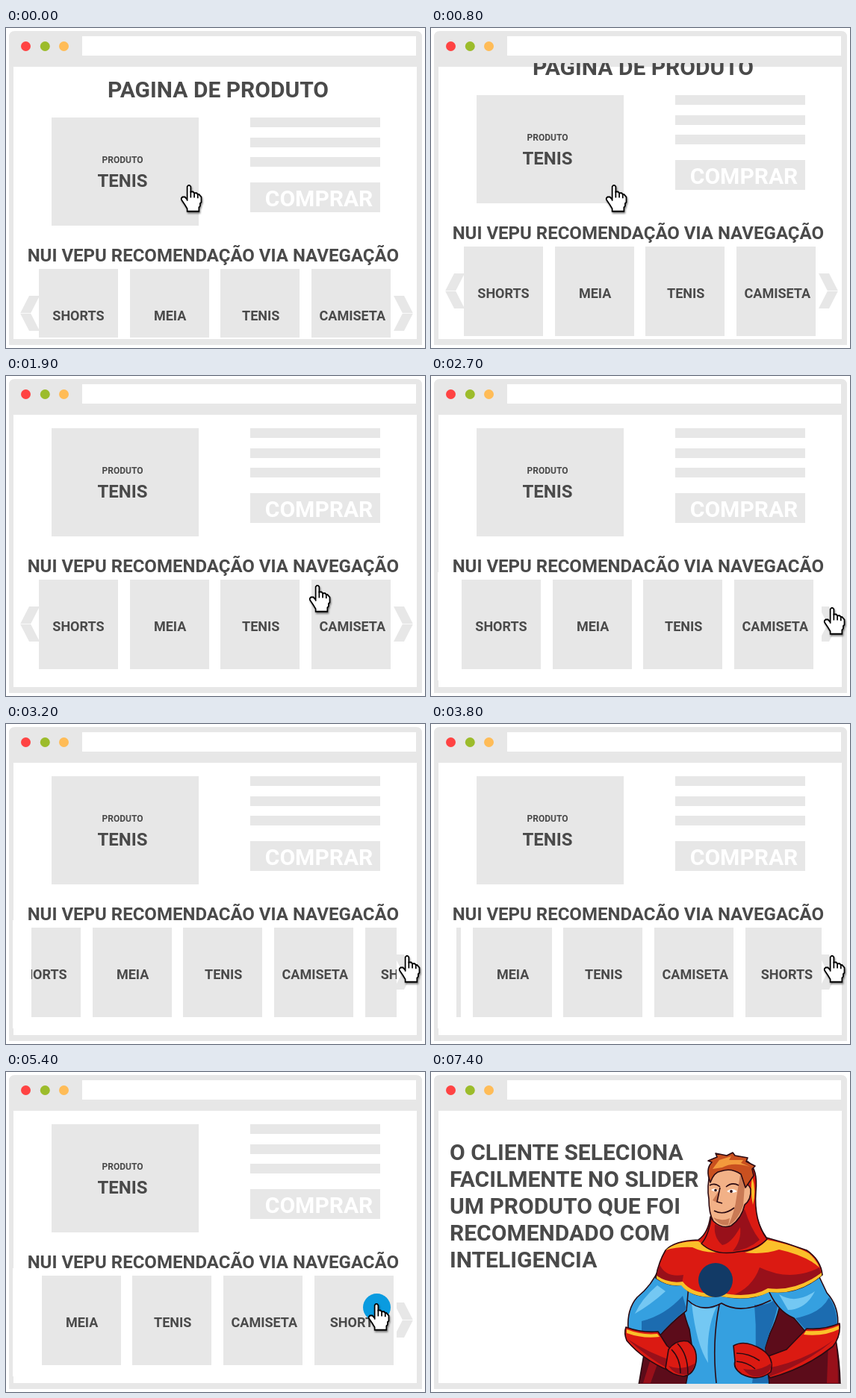
Write an HTML page that moves like this. It is 561 by 429 pixels and loops after 8 s.

```html
<!DOCTYPE html>
<html lang="pt">
<head>
<meta charset="utf-8">
<title>Slider de produtos</title>
<style>
  html, body { margin: 0; width: 100%; height: 100%; overflow: hidden; background: #fff; }
  svg { display: block; }
  text { font-family: Roboto, "Liberation Sans", sans-serif; font-weight: 700; fill: #4a4a4a; text-anchor: middle; }
  .grey { fill: #e7e7e7; }
  .white { fill: #fff; }
  #hand { filter: drop-shadow(1.5px 2px 1.2px rgba(0, 0, 0, .5)); }
  #hero path { stroke: #2b0a12; stroke-width: 1.6; stroke-linejoin: round; }
  #hero .flat { stroke: none; }
  #hero .line { fill: none; }
  .red { fill: #db1a12; } .deep { fill: #98101a; } .cape { fill: #5c0c1a; }
  .blue { fill: #35a0e0; } .shade { fill: #1c6cb0; } .sky { fill: #74c8f3; }
  .gold { fill: #fbc02a; } .skin { fill: #f2b187; } .tan { fill: #c97a55; } .hair { fill: #c9501f; } .glow { fill: #f39a3c; }
</style>
</head>
<body>
<svg width="561" height="429" viewBox="0 0 561 429">
  <defs>
    <clipPath id="page"><rect x="0" y="47" width="561" height="368"/></clipPath>
    <clipPath id="strip"><rect x="34" y="263" width="489" height="140"/></clipPath>
    <clipPath id="floor"><rect x="0" y="52" width="561" height="366"/></clipPath>
  </defs>

  <path class="grey" d="M4 425V12Q4 4 12 4H549Q557 4 557 12V425Z"/>
  <rect class="white" x="10" y="52" width="540" height="365"/>
  <rect class="white" x="102" y="11" width="447" height="26"/>
  <circle cx="26.5" cy="24.5" r="6.5" fill="#ff4343"/>
  <circle cx="52.3" cy="24.5" r="6.5" fill="#9cbc2b"/>
  <circle cx="77.5" cy="24.5" r="6.5" fill="#ffbc57"/>

  <g id="shop">
    <g clip-path="url(#page)">
      <g id="content"></g>
      <g id="slider">
        <rect class="white" x="9" y="263" width="514" height="145"/>
        <g clip-path="url(#strip)"><g id="track"></g></g>
      </g>
    </g>
    <circle id="tap" cx="496.5" cy="315.5" r="18.5" fill="#0a9be0"/>
    <g id="hand">
      <g transform="scale(1.57 1.74)" fill="#fff" stroke="#000" stroke-width="1.1">
        <path d="M5.5 12.5V1.5L6.5 .5H7.5L8.5 1.5V5.5H10.5L11.5 6.5H13.5L14.5 7.5H15.5L17.5 9.5V13.5L16.5 14.5V16.5L15.5 17.5V20.5H5.5V18.5L3.5 15.5L.5 11.5V10.5L1.5 9.5H3.5L5.5 11.5"/>
        <path fill="none" d="M8.5 5V10M11.5 6.5V10M14.5 7.5V10.5"/>
      </g>
    </g>
  </g>

  <g id="ending">
    <g id="message"></g>
    <g id="hero" clip-path="url(#floor)">
      <!-- cape -->
      <path class="cape" d="M318 250Q300 300 290 350L278 420H548Q547 360 526 295L500 250Z"/>
      <path class="deep flat" d="M298 372L284 417H294L308 378ZM532 364L530 417H545Q545 385 541 356Z"/>
      <!-- torso -->
      <path class="blue" d="M330 275Q336 320 346 345L350 372L341 420H453L447 370L454 350Q470 318 474 270Z"/>
      <path class="shade flat" d="M433 312Q458 314 468 296Q460 335 453 350L447 370L452 417H430Q438 366 433 312Z"/>
      <path class="sky flat" d="M349 310Q366 322 382 315Q368 345 371 390Q355 365 349 310Z"/>
      <path class="line" d="M344 306Q362 324 389 310Q415 326 455 306M386 312Q376 362 382 417"/>
      <!-- arms -->
      <path class="blue" d="M306 262Q296 286 276 302Q262 318 264 345L302 358Q322 335 342 320L346 275Z"/>
      <path class="shade flat" d="M282 334Q314 326 337 300L342 318Q320 336 303 356L282 350Z"/>
      <path class="sky flat" d="M303 286Q282 304 273 324Q294 312 314 294Z"/>
      <path class="blue" d="M450 288Q462 320 486 330L508 356L544 344Q548 316 530 296L512 258Z"/>
      <path class="shade flat" d="M488 330L509 354L543 341Q545 320 533 302Q522 324 488 330Z"/>
      <path class="sky flat" d="M466 298Q488 312 514 294Q502 318 478 319Z"/>
      <!-- gloves -->
      <path class="red" d="M261 342Q258 350 262 360Q284 386 318 400L336 384L316 367L304 348Q282 350 261 342Z"/>
      <path class="deep flat" d="M263 358Q290 383 318 398L328 389Q290 376 263 358Z"/>
      <path class="gold flat" d="M262 345Q282 353 303 351L306 355Q284 358 262 350Z"/>
      <path class="red" d="M318 372Q328 358 344 361Q357 370 355 388Q352 406 338 408Q322 406 314 397Z"/>
      <path class="deep flat" d="M318 394Q334 401 353 391Q350 405 338 406Q325 405 318 394Z"/>
      <path class="line" d="M330 364Q344 378 344 405M322 372Q334 384 334 404"/>
      <path class="red" d="M503 344Q526 346 547 337Q549 354 538 368Q500 398 454 410L438 386L476 372Z"/>
      <path class="deep flat" d="M541 358Q504 390 454 408L446 398Q500 388 541 358Z"/>
      <path class="gold flat" d="M502 347Q526 349 546 340V345Q526 355 499 352Z"/>
      <path class="red" d="M405 367Q420 358 443 372Q460 383 455 402Q438 416 416 405Q404 397 407 388Z"/>
      <path class="deep flat" d="M418 398Q440 402 456 390Q456 404 440 408Q426 410 418 398Z"/>
      <path class="line" d="M409 377Q426 377 440 387M409 388Q424 389 434 398"/>
      <!-- shoulders -->
      <path class="red" d="M374 194Q371 216 358 225Q326 226 314 239Q304 256 301 276Q318 288 336 285Q350 305 388 300Q428 308 452 294Q490 300 524 272Q522 252 503 239Q476 229 449 222Q438 207 434 186Z"/>
      <path class="deep flat" d="M418 208Q428 226 450 237Q424 246 398 237ZM440 262Q482 282 520 262L523 272Q488 298 452 293Q428 306 402 300Q430 290 440 262ZM306 258Q314 276 338 272L336 284Q318 287 302 275Z"/>
      <path class="gold flat" d="M314 239Q330 226 358 227Q372 238 394 240Q370 245 350 235Q330 234 314 239ZM420 242Q440 237 450 225Q486 232 506 243Q516 252 520 262Q502 246 466 238Q446 245 420 242Z"/>
      <path class="gold flat" d="M302 273Q318 284 337 281Q351 300 388 296Q428 304 451 290Q488 295 523 269V273Q490 300 453 295Q428 308 388 301Q350 305 335 286Q317 288 302 277Z"/>
      <circle cx="381" cy="279" r="23" fill="#123a66"/>
      <!-- head -->
      <path class="red" d="M376 190Q372 220 362 230Q380 247 411 241Q436 239 450 224Q432 200 435 160Q438 130 424 120L390 118Z"/>
      <path class="deep flat" d="M380 204Q398 216 420 184Q428 210 440 225Q424 239 404 240Q416 226 414 208Q402 230 390 232Q378 222 380 204Z"/>
      <path class="gold flat" d="M430 140Q436 160 431 178Q427 160 430 140Z"/>
      <path class="skin" d="M374 134Q369 154 372 170Q372 190 378 200Q390 211 402 206Q416 196 420 178Q429 171 428 157Q424 148 420 150L416 126L382 124Z"/>
      <path class="tan flat" d="M414 138L420 152L418 179Q411 199 398 206Q407 186 409 168ZM378 195Q389 201 400 196L398 205Q386 207 378 195ZM387 157L383 175L377 172Z"/>
      <path class="hair" d="M374 148Q367 130 376 121L371 119L383 114L381 109L396 112L404 108L407 112L424 115L422 120L434 126L430 130L432 139L421 155L415 137Q402 128 388 133Q379 134 374 148Z"/>
      <path class="glow flat" d="M377 130L386 118L402 113L399 118L418 118L415 122L427 127Q404 120 390 128Z"/>
      <path class="line" d="M373 152Q380 148 387 154M395 154Q403 147 412 152M387 155L383 174L390 176M379 186Q392 193 406 182"/>
      <path class="white flat" d="M375 158Q380 154 385 159Q380 162 375 158ZM396 160Q403 154 410 160Q403 164 396 160Z"/>
      <circle cx="381" cy="158.500" r="1.800" fill="#2b0a12"/>
      <circle cx="402" cy="160" r="1.900" fill="#2b0a12"/>
    </g>
  </g>
</svg>
<script>
const LOOP = 8000, STEP = 100;
const $ = id => document.getElementById(id);
const rect = (x, y, w, h) => `<rect class="grey" x="${x}" y="${y}" width="${w}" height="${h}"/>`;
const label = (str, x, y, size, style = '') =>
  `<text x="${x}" y="${y}" font-size="${size}" style="${style}">${str}</text>`;

const products = ['SHORTS', 'MEIA', 'TENIS', 'CAMISETA', 'SHORTS'];
const cards = (count, top) => products.slice(0, count).map((name, i) => {
  const x = Math.round(44 + i * 121.7);
  return rect(x, top, 106, 120) + label(name, x + 53 + i * 0.6, top + 69, 18);
}).join('');

const arrow = (x, dir) =>
  `<g transform="translate(${x} 359) scale(${dir} 1)">
    <path class="grey" d="M0 0H14L26 23.500L14 47H0L12 23.500Z"/>
    <path d="M11 23.500H26" stroke="#fff" stroke-width=".8"/>
  </g>`;

$('content').innerHTML =
  label('PAGINA DE PRODUTO', 284, 92.5, 30) +
  rect(61, 120, 197, 145) + label('PRODUTO', 156, 181, 12) + label('TENIS', 156, 213, 24) +
  [120, 147, 173].map(y => rect(327, y, 174, 13)).join('') +
  rect(327, 207, 174, 40) + label('COMPRAR', 419, 238.5, 30, 'fill:#fff') +
  label('NUI VEPU RECOMENDAÇÃO VIA NAVEGAÇÃO', 526, 313, 24, 'text-anchor:end') +
  arrow(45, -1) + arrow(519, 1) + cards(4, 323);

$('track').innerHTML = cards(5, 273);

$('message').innerHTML =
  ['O CLIENTE SELECIONA', 'FACILMENTE NO SLIDER', 'UM PRODUTO QUE FOI', 'RECOMENDADO COM', 'INTELIGENCIA']
    .map((line, i) => label(line, 25, 118 + 36 * i, 30, 'text-anchor:start')).join('');

// Keys are [time, value...]; values between keys are linear.
const scrollKeys = [[400, 0], [600, 20], [700, 20], [1000, 50]];
const slideKeys = [[2600, 0], [2700, 3], [2800, 10], [3800, 110], [3900, 118]];
const handKeys = [
  [1000, 234, 210], [1600, 346, 278], [1900, 406, 280], [2500, 526, 310],
  [3900, 526, 310], [4200, 505, 310], [4600, 505, 310], [4700, 495, 310],
  [4800, 495, 310], [4900, 485, 310]
];

function at(keys, time) {
  const next = keys.findIndex(key => key[0] > time);
  if (next === 0) return keys[0].slice(1);
  if (next < 0) return keys[keys.length - 1].slice(1);
  const a = keys[next - 1], b = keys[next];
  const k = (time - a[0]) / (b[0] - a[0]);
  return a.slice(1).map((v, i) => Math.round(v + (b[i + 1] - v) * k));
}

const show = (id, on) => $(id).setAttribute('display', on ? 'inline' : 'none');
const move = (id, x, y) => $(id).setAttribute('transform', `translate(${x} ${y})`);

function draw(ms) {
  const time = Math.floor(ms % LOOP / STEP) * STEP;
  show('shop', time < 7400);
  show('ending', time >= 7400);
  show('slider', time >= 2600);
  show('tap', time >= 5400);
  move('content', 0, -at(scrollKeys, time)[0]);
  move('track', -at(slideKeys, time)[0], 0);
  move('hand', ...at(handKeys, time));
}

const start = performance.now();
function tick() {
  draw(performance.now() - start);
  requestAnimationFrame(tick);
}
tick();
</script>
</body>
</html>
```
